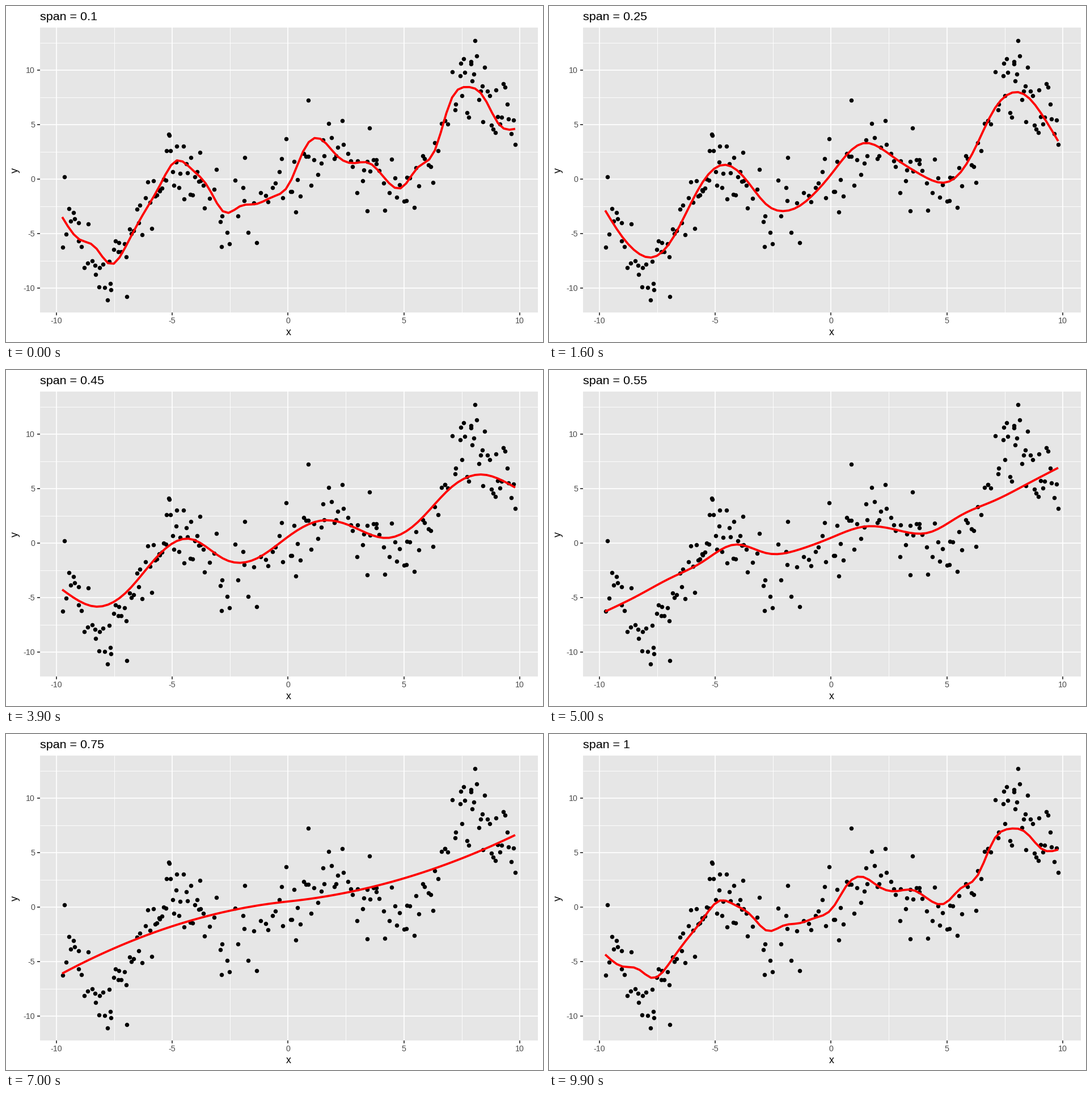
These frames come from a looping animation (947 px wide and 592 px high, 10 s). A matplotlib script:

```python
import numpy as np
import matplotlib.pyplot as plt
from matplotlib.animation import FuncAnimation
from matplotlib.patches import Rectangle

W, H, DPI = 947, 592, 100
PT = 72 / DPI  # points per pixel
LEFT, RIGHT, TOP, BOTTOM = 59.5, 938, 38, 540

plt.rcParams["font.family"] = "Liberation Sans"
fig = plt.figure(figsize=(W / DPI, H / DPI), dpi=DPI, facecolor="white")
ax = fig.add_axes([0, 0, 1, 1])
ax.set_xlim(0, W)
ax.set_ylim(H, 0)
ax.axis("off")


def px(x):
    return 497.3 + 40.84 * x


def py(y):
    return 304.7 - 19.18 * y


def label(x, y, text, size, color="black", ha="center", **kw):
    return ax.text(x, y, text, fontsize=size * PT, color=color, ha=ha,
                   va="baseline", **kw)


def rule(x, y, width, color="white"):
    ax.plot(x, y, color=color, lw=width * PT, solid_capstyle="butt", zorder=1)


def draw_panel():
    ax.add_patch(Rectangle((LEFT, TOP), RIGHT - LEFT, BOTTOM - TOP,
                           facecolor="#E6E6E6", edgecolor="none", zorder=0))
    for v in np.arange(-7.5, 13, 5):
        rule([LEFT, RIGHT], [py(v)] * 2, 0.9)
        if v < 10:
            rule([px(v)] * 2, [TOP, BOTTOM], 0.9)
    for v in range(-10, 11, 5):
        x, y = px(v), py(v)
        rule([x, x], [TOP, BOTTOM], 1.75)
        rule([LEFT, RIGHT], [y, y], 1.75)
        rule([x, x], [BOTTOM, BOTTOM + 4.5], 1.75, "#333333")
        rule([LEFT - 4.5, LEFT], [y, y], 1.75, "#333333")
        label(x, 559, str(v), 14.3, "#4D4D4D")
        label(51, y + 5, str(v), 14.3, "#4D4D4D", ha="right")
    label(498.5, 580, "x", 17.9)
    label(20.5, 289, "y", 17.9, rotation=90, rotation_mode="anchor")


grid = np.linspace(-9.75, 9.81, 80)


def spline(*heights):
    """Natural cubic spline through evenly spaced heights, on the grid."""
    y = np.array(heights)
    n = len(y)
    system = 4 * np.eye(n) + np.eye(n, k=1) + np.eye(n, k=-1)
    system[0, 0] = system[-1, -1] = 2
    padded = np.pad(y, 1, mode="edge")
    slope = np.linalg.solve(system, 3 * (padded[2:] - padded[:-2]))
    s = np.linspace(0, n - 1, len(grid))
    i = np.minimum(s.astype(int), n - 2)
    t = s - i
    return ((1 + 2 * t) * (1 - t) ** 2 * y[i] + t * (1 - t) ** 2 * slope[i]
            + t * t * (3 - 2 * t) * y[i + 1] + t * t * (t - 1) * slope[i + 1])


# Smoother at a few spans; wide spans leave only the broad trend
broad = 0.5 + 0.22 * grid + 0.044 * grid * abs(grid) - 0.003 * grid ** 2
KEYS = {
    0.1: spline(-3.5, -5.5, -6.2, -7.85, -6, -3.25, -0.7, 1.65, 0.9, -0.7,
                -3.05, -2.5, -2.3, -1.65, -0.55, 2.85, 3.65, 2.1, 1.45, 1.45,
                -0.05, -0.8, 1.1, 2.5, 7.15, 8.45, 7.65, 5, 4.6),
    0.2375: spline(-2.85, -6.85, -5.9, -0.3, 1, -2.4, -2.55, 0.55, 3.35, 1.85,
                   0, 0.55, 6.25, 7.75, 3.35),
    0.35: spline(-2.85, -6.55, -5.35, -0.55, 0.7, -1.85, -2.05, 0.7, 2.45,
                 1.65, 0.1, 1.5, 5.9, 6.95, 3.8),
    0.55: spline(-6.3, -4.85, -3.25, -1.75, -0.15, -0.95, -0.6, 0.5, 1.5, 1.2,
                 0.95, 2.55, 3.85, 5.35, 6.9),
    0.75: broad,
    1.0: broad,
}
knots = list(KEYS)


def smoother(span):
    i = min(np.searchsorted(knots, span, "right"), len(knots) - 1)
    a, b = knots[i - 1], knots[i]
    t = (span - a) / (b - a)
    return (1 - t) * KEYS[a] + t * KEYS[b]


# The few points that stand far from the crowd
OUTLIERS = [(-7.8, -11.1), (-6.95, -10.8), (-7.65, -10.2), (-9.73, -6.25),
            (-2.86, -6.2), (-5.12, 4), (-1.86, 1.95), (0.33, -3.05),
            (0.88, 7.25), (3.52, 4.7), (3.43, -2.95), (7.46, 10.6),
            (7.9, 10.8), (8.08, 12.7), (9.81, 3.15)]


def scatter_points(n=185):
    """Noise about the trend, denser in x where the sample is denser."""
    rng = np.random.RandomState(4)
    share = (np.arange(n) + rng.rand(n)) / n
    x = np.interp(share, [0, 0.2, 0.375, 0.48, 0.77, 0.84, 1],
                  [-9.75, -6, -3.6, -0.5, 5.9, 7.4, 9.75])
    noise = np.clip(rng.normal(0, 1.8, n), -3.4, 3.4)
    y = np.interp(x, grid, smoother(0.25)) + noise
    ox, oy = np.transpose(OUTLIERS)
    return np.append(x, ox), np.append(y, oy)


draw_panel()
dot_x, dot_y = scatter_points()
ax.plot(px(dot_x), py(dot_y), "o", color="black", ms=7.5 * PT, mew=0,
        snap=False, zorder=3)
line, = ax.plot([], [], color="#FF0000", lw=3.8 * PT, solid_capstyle="butt",
                solid_joinstyle="round", zorder=4)
title = label(LEFT, 25, "", 21.5, ha="left")

SPANS = [round(0.1 + 0.05 * i, 2) for i in range(19)]
STARTS = list(range(2, 33, 6)) + list(range(38, 99, 5))
LAST = len(SPANS) - 1


def state_at(frame):
    """Index of the current span and the progress to the next one."""
    i = np.searchsorted(STARTS, frame, "right") - 1
    if i < 0:
        return 0, 0.0
    steps = 4 if i < 6 else 3
    return i, min(1.0, (frame - STARTS[i] + 1) / steps)


def draw(frame):
    i, t = state_at(frame)
    here, there = SPANS[i], SPANS[(i + 1) % len(SPANS)]
    y = (1 - t) * smoother(here) + t * smoother(there)
    line.set_data(px(grid), py(y))
    shown = there if t >= 0.5 and i < LAST else here
    title.set_text(f"span = {shown:g}")
    return line, title


anim = FuncAnimation(fig, draw, frames=100, interval=100, repeat=True,
                     repeat_delay=0, blit=False)
plt.show()
```
